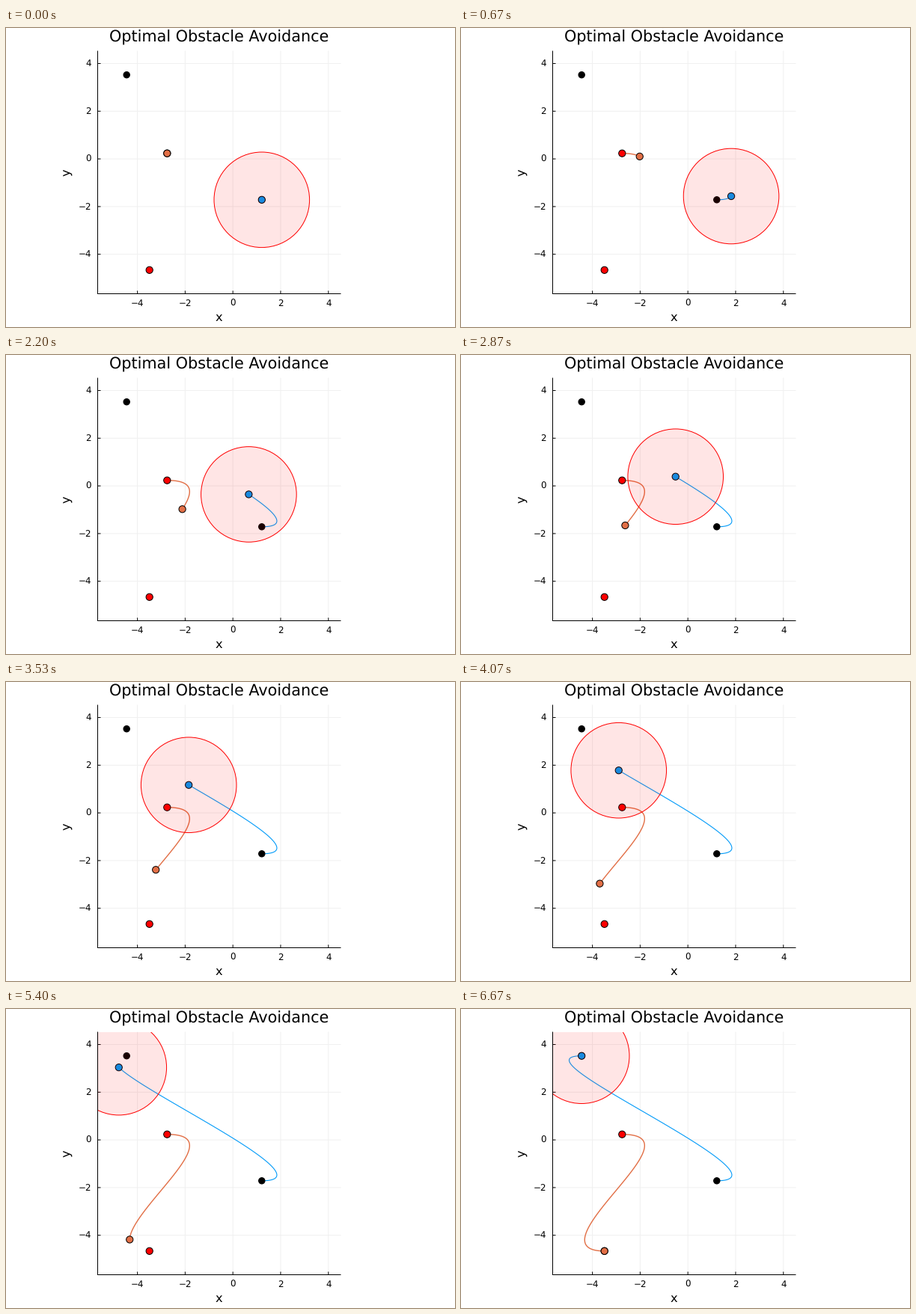
Recreate the animation shown at these times as a matplotlib script. Size 600x400 px, loop 6740 ms.

```python
import numpy as np
import matplotlib.pyplot as plt
from matplotlib.animation import FuncAnimation
from matplotlib.patches import Circle, Rectangle

plt.rcParams["font.family"] = "DejaVu Sans"
plt.rcParams["text.hinting"] = "none"

W, H, DPI = 600, 400, 100
PX = 72 / DPI            # points per pixel
UNIT = 31.9              # pixels per data unit
X0, Y0 = 303.2, 175.1    # pixel position of the data origin
LEFT, RIGHT, TOP, BOTTOM = 122.5, 447.5, 30.5, 355.5
STEPS, FPS = 100, 15     # the motion advances 15 steps a second
TICK_MS, LOOP_MS = 20, 6740

BLUE, ORANGE = "#009af9", "#e26f46"


def path(x_coef, y_coef):
    """Quartic path in pixels, coefficients in rising order."""
    t = np.linspace(0, 1, STEPS + 1)
    return np.polyval(x_coef[::-1], t), np.polyval(y_coef[::-1], t)


blue_x, blue_y = path([341.8, 330.1, -1466.2, 913.5, 42],
                      [229.8, 0, -517.3, 366.2, -16])
orange_x, orange_y = path([215.3, 333, -1057, 715.4, -15],
                          [167.7, 0, 443.3, -262.2, -25])

fig = plt.figure(figsize=(W / DPI, H / DPI), dpi=DPI, facecolor="white")
ax = fig.add_axes([0, 0, 1, 1])
ax.set_xlim(0, W)
ax.set_ylim(H, 0)
ax.axis("off")


def line(xs, ys, color, width=1.0, z=1):
    return ax.plot(xs, ys, color=color, lw=width * PX, zorder=z,
                   solid_capstyle="butt", snap=False)[0]


def label(x, y, s, px, **kw):
    ax.text(x, y, s, fontsize=px * PX, color="black",
            **{"ha": "center", "va": "baseline", **kw})


def dot(x, y, color, z, r=4.6):
    return ax.add_patch(Circle((x, y), r, facecolor=color, edgecolor="black",
                               lw=PX, zorder=z, snap=False))


# Grid, ticks and tick labels
for v in range(-4, 5, 2):
    gx, gy = X0 + v * UNIT, Y0 - v * UNIT
    text = str(v).replace("-", "\u2212")
    line([gx, gx], [TOP, BOTTOM], "#f0f0f0", z=0)
    line([LEFT, RIGHT], [gy, gy], "#f0f0f0", z=0)
    line([gx, gx], [BOTTOM, BOTTOM - 4], "black")
    line([LEFT, LEFT + 4], [gy, gy], "black")
    label(gx, 371.5, text, 11.9)
    label(114, gy + 3.8, text, 11.9, ha="right")

line([LEFT, LEFT], [TOP, BOTTOM + 0.5], "black", z=6)
line([LEFT - 0.5, RIGHT], [BOTTOM, BOTTOM], "black", z=6)

label(285, 19, "Optimal Obstacle Avoidance", 20.8)
label(284.6, 391.5, "x", 16.3)
label(86, 193, "y", 16.3, rotation=90, rotation_mode="anchor")

# Start and goal points
for i in (0, STEPS):
    dot(blue_x[i], blue_y[i], "black", 3, r=4.2)
    dot(orange_x[i], orange_y[i], "red", 3)

# Moving parts
blue_trail = line([], [], BLUE, 1.1, 2)
orange_trail = line([], [], ORANGE, 1.4, 2)
blue_dot = dot(blue_x[0], blue_y[0], BLUE, 4)
orange_dot = dot(orange_x[0], orange_y[0], ORANGE, 4)

zone = Circle((blue_x[0], blue_y[0]), 2 * UNIT, facecolor=(1, 0, 0, 0.1),
              edgecolor="red", lw=PX, zorder=5)
ax.add_patch(zone)
frame_box = Rectangle((LEFT, TOP), RIGHT - LEFT, BOTTOM - TOP,
                      transform=ax.transData)
zone.set_clip_path(frame_box)


def update(n):
    # Steps are shown from the nearest hundredth of a second
    ms = (n + 0.5) * TICK_MS + 5
    k = min(int(ms * FPS / 1000), STEPS)
    blue_trail.set_data(blue_x[:k + 1], blue_y[:k + 1])
    orange_trail.set_data(orange_x[:k + 1], orange_y[:k + 1])
    blue_dot.center = zone.center = (blue_x[k], blue_y[k])
    orange_dot.center = (orange_x[k], orange_y[k])
    return blue_trail, orange_trail, blue_dot, orange_dot, zone


anim = FuncAnimation(fig, update, frames=LOOP_MS // TICK_MS,
                     interval=TICK_MS, repeat=True, repeat_delay=0,
                     blit=False)
plt.show()
```
